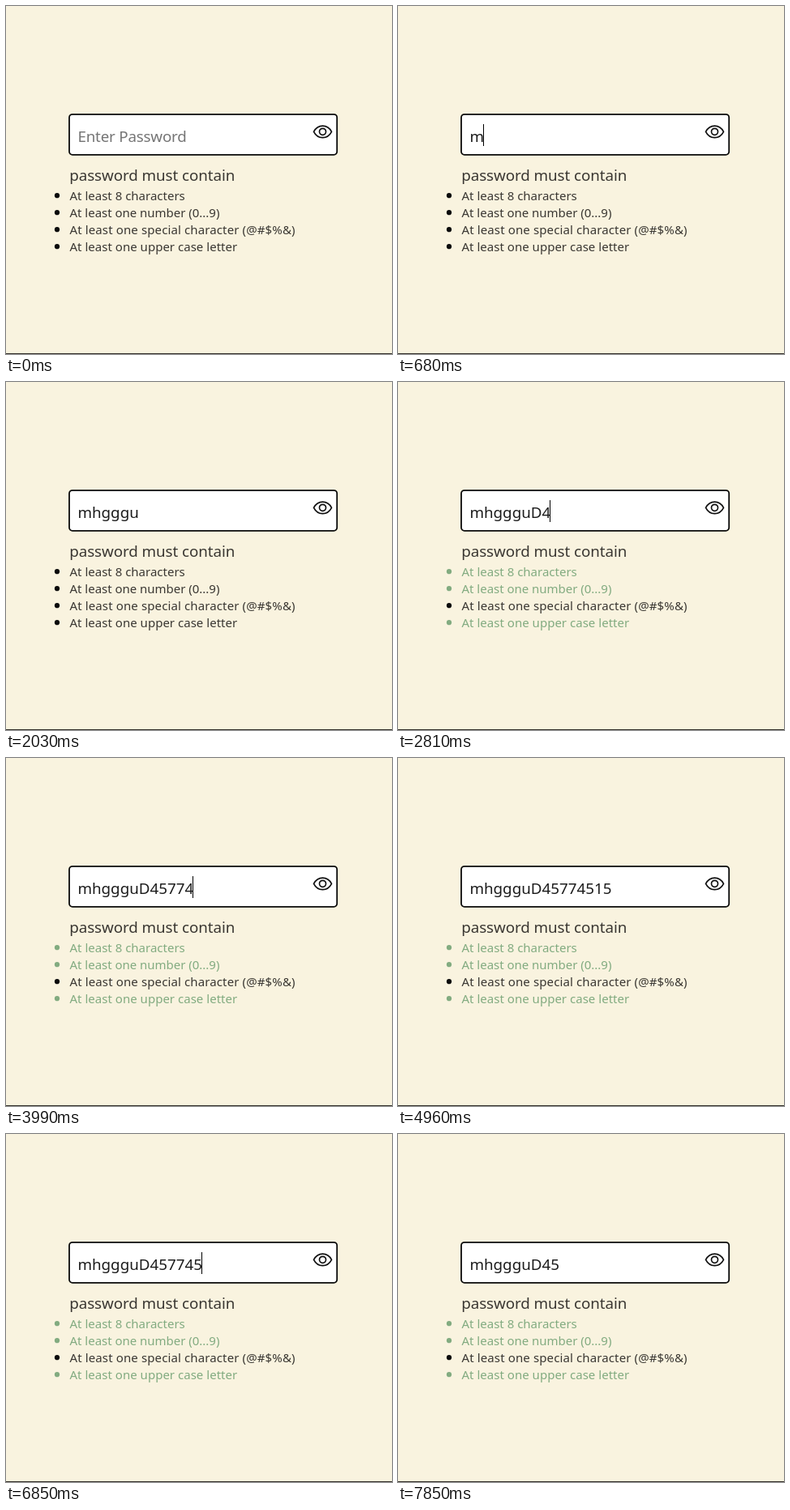
Animation of 476 by 430 pixels, one loop 8 s. Source, as an HTML page with a canvas:

```html
<!DOCTYPE html>
<html lang="en">
<head>
<meta charset="utf-8">
<title>Password check</title>
<style>
  html, body { margin: 0; width: 100%; height: 100%; overflow: hidden; background: #f9f3df; }
  canvas { display: block; width: 476px; height: 430px; }
</style>
</head>
<body>
<canvas id="stage"></canvas>
<script>
const W = 476, H = 430, LOOP = 8000;
const FONT = '"Noto Sans", "Open Sans", sans-serif';
const INK = '#3a3732', GREEN = '#82ab80';

const canvas = document.getElementById('stage');
const ratio = window.devicePixelRatio || 1;
canvas.width = W * ratio;
canvas.height = H * ratio;
const ctx = canvas.getContext('2d');
ctx.scale(ratio, ratio);

// Key presses as [time, key]; '<' is backspace.
const keys = [
  [530, 'm'], [860, 'h'], [1020, 'g'], [1160, 'g'], [1310, 'g'], [1480, 'u'],
  [2400, 'D'], [2700, '4'], [2950, '5'], [3520, '7'], [3690, '7'], [3990, '4'],
  [4170, '5'], [4190, '1'], [4350, '5'], [5290, '*'],
  [6350, '<'], [6650, '<'], [6850, '<'], [7060, '<'],
  [7640, '<'], [7670, '<'], [7820, '<']
];

// Spans in which the caret shows, as [from, to].
const caretSpans = [
  [260, 1980], [2400, 4960], [5290, 5770], [6350, 7340], [7640, 7850]
];

const rules = [
  { label: 'At least 8 characters', spacing: 0, test: s => s.length >= 8 },
  { label: 'At least one number (0...9)', spacing: -0.02, test: s => /\d/.test(s) },
  { label: 'At least one special character (@#$%&)', spacing: 0.12, test: s => /[^a-z0-9]/i.test(s) },
  { label: 'At least one upper case letter', spacing: 0.02, test: s => /[A-Z]/.test(s) }
];

function valueAt(t) {
  let value = '';
  for (const [time, key] of keys) {
    if (time > t) break;
    value = key === '<' ? value.slice(0, -1) : value + key;
  }
  return value;
}

function text(str, x, y, size, color, spacing = 0) {
  ctx.font = `${size}px ${FONT}`;
  ctx.letterSpacing = spacing + 'px';
  ctx.fillStyle = color;
  ctx.fillText(str, x, y);
}

function drawBox() {
  ctx.beginPath();
  ctx.roundRect(78, 133.8, 330.2, 50, 4);
  ctx.fillStyle = '#fff';
  ctx.fill();
  ctx.lineWidth = 1.8;
  ctx.strokeStyle = '#0a0a0a';
  ctx.stroke();
}

function drawEye(x, y) {
  ctx.lineWidth = 1.7;
  ctx.strokeStyle = '#111';
  ctx.lineJoin = 'round';
  ctx.beginPath();
  ctx.moveTo(x - 11, y);
  ctx.bezierCurveTo(x - 6, y - 9.7, x + 6, y - 9.7, x + 11, y);
  ctx.bezierCurveTo(x + 6, y + 9.7, x - 6, y + 9.7, x - 11, y);
  ctx.closePath();
  ctx.stroke();
  ctx.beginPath();
  ctx.arc(x, y, 4, 0, Math.PI * 2);
  ctx.stroke();
}

function drawField(t, value) {
  drawBox();
  if (value) text(value, 88.4, 167.6, 18.8, '#1c1c1c');
  else text('Enter Password', 88.4, 167.6, 18.8, '#757575', -0.2);
  if (caretSpans.some(([from, to]) => t >= from && t < to)) {
    const x = 88.4 + (value ? ctx.measureText(value).width : 0);
    ctx.fillStyle = '#000';
    ctx.fillRect(Math.floor(x - 0.4), 146, 1, 27);
  }
  drawEye(390.5, 155.3);
}

function drawRules(value) {
  text('password must contain', 78.2, 215.5, 18.8, INK, -0.07);
  rules.forEach(({ label, spacing, test }, i) => {
    const met = test(value);
    const y = 234 + 21 * i;
    text(label, 78.5, y + 5.6, 15, met ? GREEN : INK, spacing);
    ctx.fillStyle = met ? GREEN : '#0a0a0a';
    ctx.beginPath();
    ctx.arc(63, y + 0.2, 3.1, 0, Math.PI * 2);
    ctx.fill();
  });
}

function draw(t) {
  const value = valueAt(t);
  ctx.fillStyle = '#f9f3df';
  ctx.fillRect(0, 0, W, H);
  drawField(t, value);
  drawRules(value);
  ctx.fillStyle = '#35322d';
  ctx.fillRect(0, 429, W, 1);
}

const start = performance.now();
function tick() {
  draw((performance.now() - start) % LOOP);
  requestAnimationFrame(tick);
}
tick();
</script>
</body>
</html>
```
